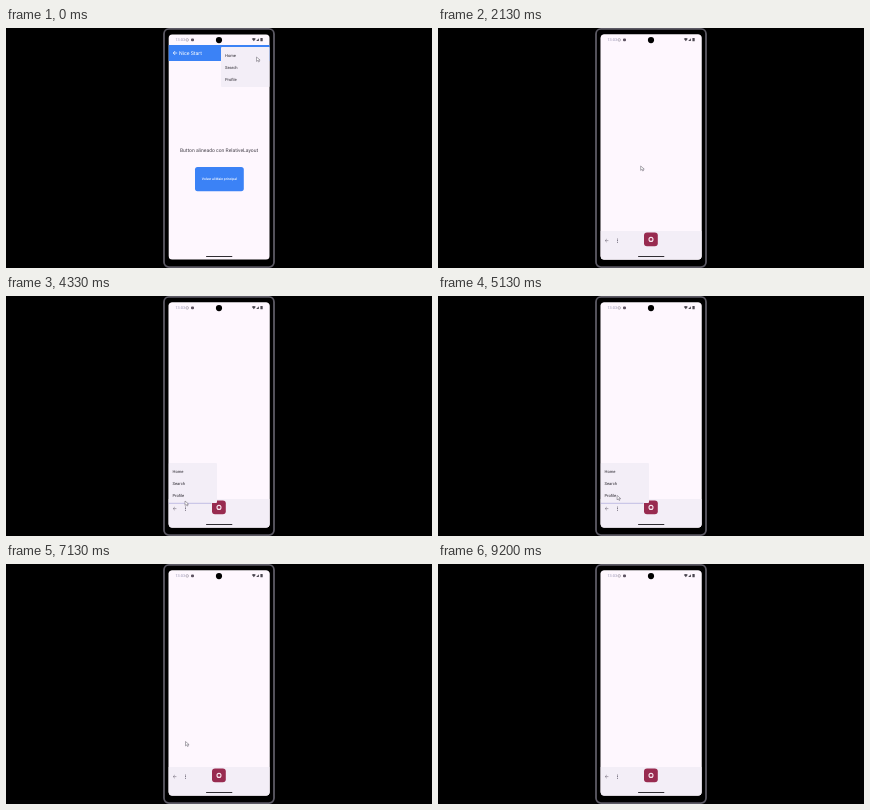
Write an HTML page that moves like this. It is 426 px wide and 240 px high and loops after 9270 ms.

```html
<!DOCTYPE html>
<html lang="es">
<head>
<meta charset="utf-8">
<title>App bars</title>
<style>
html, body { margin: 0; width: 100%; height: 100%; overflow: hidden; background: #000; }
svg { display: block; width: 100%; height: 100%; }
text { font-family: Roboto, sans-serif; text-rendering: geometricPrecision; }
</style>
</head>
<body>
<svg viewBox="0 0 426 240">
  <defs>
    <clipPath id="clip"><rect x="162.7" y="6.4" width="100.8" height="225" rx="3.5"/></clipPath>
    <path id="arrow" d="M2 0H-2M0-2L-2 0L0 2" fill="none" stroke-width=".7"/>
  </defs>
  <rect width="426" height="240"/>
  <rect x="158" y=".9" width="110" height="238.2" rx="5" stroke="#5c5a64" stroke-width="1.8"/>

  <g clip-path="url(#clip)">
    <rect x="162" y="6" width="102" height="226" fill="#fef7fe"/>

    <g id="first">
      <rect x="162" y="17" width="102" height="16" fill="#3b82f6"/>
      <use href="#arrow" x="169.2" y="25" stroke="#fff"/>
      <text x="173" y="26.8" font-size="5.2" fill="#fff">Nice Start</text>
      <g fill="#30343c">
        <rect x="231.6" y="23" width="5" height="4" rx=".7"/>
        <circle cx="245.8" cy="25" r="2.5"/>
        <rect x="255.4" y="22.7" width="4.6" height="4.6" rx=".8"/>
      </g>
      <circle cx="245.8" cy="25" r=".8" fill="#7f9fd2"/>
      <text x="213" y="123.5" font-size="5" text-anchor="middle" fill="#45414a">Button alineado con RelativeLayout</text>
      <rect x="189" y="139" width="48.8" height="24.2" rx="2.6" fill="#3b82f6"/>
      <text x="213.3" y="152.4" font-size="3.35" font-weight="500" text-anchor="middle" fill="#fff">Volver al Main principal</text>
    </g>

    <g id="second">
      <rect x="162" y="6" width="102" height="226" fill="#fef7fe"/>
      <rect x="162" y="203" width="102" height="29" fill="#f3eef7"/>
      <use href="#arrow" transform="translate(168.8 212.6) scale(.8)" stroke="#6f6a78"/>
      <g fill="#6b6574">
        <circle cx="179.5" cy="211" r=".55"/><circle cx="179.5" cy="212.6" r=".55"/><circle cx="179.5" cy="214.2" r=".55"/>
      </g>
      <rect x="206" y="204.6" width="13.8" height="13.6" rx="3" fill="#982b50"/>
      <circle cx="213" cy="211.4" r="2" fill="none" stroke="#f7e6ee" stroke-width="1.1"/>
    </g>

    <g id="topMenu"></g>
    <g id="lowMenu"></g>

    <text x="169.4" y="13.2" font-size="3.9" fill="#9a96b4">13:03</text>
    <circle cx="181.2" cy="11.9" r="1.3" fill="none" stroke="#8b8594" stroke-width=".6"/>
    <rect x="185" y="10.4" width="3" height="2.8" rx="1" fill="#5e5362"/>
    <g fill="#4b4750">
      <path d="M245.8 10.7Q247.8 9.4 249.8 10.7L247.8 13.2Z"/>
      <path d="M250.2 13.1L252.9 10.2V13.1Z"/>
      <rect x="254.4" y="10" width="2.3" height="3.2" rx=".5"/>
    </g>
    <rect x="200" y="228" width="26.4" height="1.1" rx=".5" fill="#302d33"/>
  </g>
  <circle cx="213" cy="12.1" r="3.1"/>
  <path id="cursor" d="M0 0V4.4L1.2 3.4L2 5L2.9 4.6L2.1 3.1H3.6Z" fill="#fff" stroke="#6b6672" stroke-width=".55" stroke-linejoin="round"/>
</svg>
<script>
const LOOP = 9270;
const get = id => document.getElementById(id);
const [first, second, topMenu, lowMenu, cursor] =
  ['first', 'second', 'topMenu', 'lowMenu', 'cursor'].map(get);

function fillMenu(node, x, y, w, edge) {
  const items = ['Home', 'Search', 'Profile'].map((label, i) =>
    `<text x="${x + 4}" y="${y + 9.9 + i * 11.9}" font-size="4.1" fill="#2c2931">${label}</text>`);
  node.innerHTML = `<rect x="${x}" y="${y}" width="${w}" height="40" rx="1" fill="#f3eef7"/>` +
    (edge ? `<path d="M${x} ${y + 40.3}H${x + 43}" stroke="#b5b3e0" stroke-width=".8"/>` : '') + items.join('');
}
fillMenu(topMenu, 215, 19, 49, false);
fillMenu(lowMenu, 162.5, 167, 48.5, true);

const ramp = (t, from, to) => Math.min(1, Math.max(0, (t - from) / (to - from)));
const smooth = k => k * k * (3 - 2 * k);

// time, x, y
const path = [
  [0, 250.5, 29], [450, 250.5, 29], [1150, 236, 37.3], [1550, 236, 37.3],
  [2600, 178.5, 211], [3300, 178.5, 211], [4200, 179, 205],
  [4900, 179, 205], [5700, 179.5, 177.5], [LOOP, 179.5, 177.5]
];

function pointer(t) {
  const i = path.findIndex((p, n) => n > 0 && t <= p[0]);
  const [a, b] = [path[i - 1], path[i]];
  const k = smooth(ramp(t, a[0], b[0]));
  return [a[1] + (b[1] - a[1]) * k, a[2] + (b[2] - a[2]) * k];
}

function draw(t) {
  const page = smooth(ramp(t, 1560, 1800));
  first.setAttribute('opacity', page < 1 ? 1 : 0);
  second.setAttribute('opacity', page);
  second.setAttribute('transform', `translate(${(1 - page) * 10} 0)`);
  topMenu.setAttribute('opacity', 1 - ramp(t, 1310, 1500));
  lowMenu.setAttribute('opacity', ramp(t, 3050, 3200) * (1 - ramp(t, 6400, 6580)));
  cursor.setAttribute('transform', `translate(${pointer(t)})`);
  cursor.setAttribute('opacity', t < 8400 ? 1 : 0);
}

const start = performance.now();
function tick() {
  draw((performance.now() - start) % LOOP);
  requestAnimationFrame(tick);
}
tick();
</script>
</body>
</html>
```
